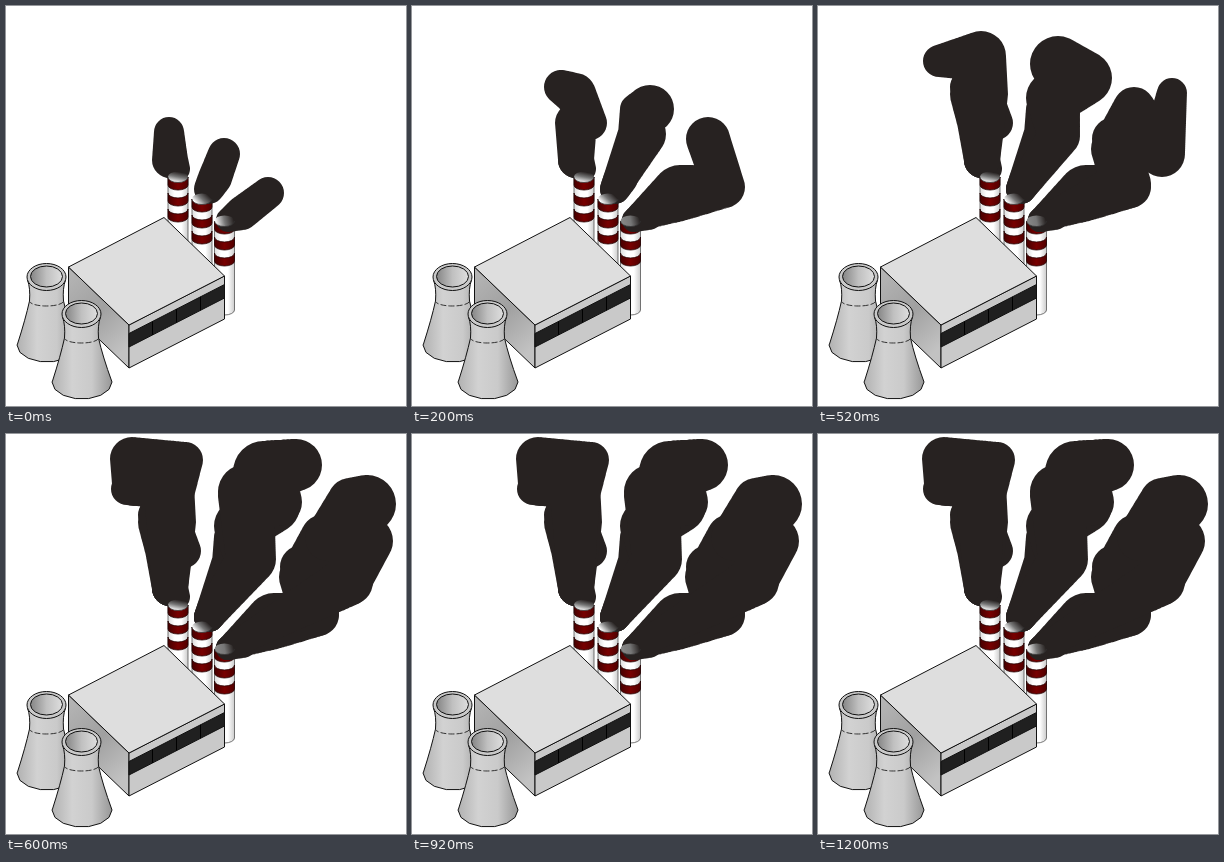
Recreate the animation shown at these times as an HTML page with a canvas. Size 400 by 400 pixels, loop 1400 ms.

```html
<!DOCTYPE html>
<html lang="en">
<head>
<meta charset="utf-8">
<title>Factory smoke</title>
<style>
html, body { margin: 0; height: 100%; overflow: hidden; background: #fff; }
canvas { display: block; width: 100vw; height: 100vh; }
</style>
</head>
<body>
<canvas id="stage" width="400" height="400"></canvas>
<script>
const ctx = document.getElementById('stage').getContext('2d');
const STEP = 200, LOOP = 1400, SMOKE = '#272221', INK = '#111';

// Puffs are x, y, radius. Each step adds a chain of puffs that tapers to the foot.
const left = {
  foot: [164, 154, 18],
  steps: [
    [[172, 163, 12], [164, 154, 18], [163, 126, 15]],
    [[149, 81, 17], [163, 88, 21], [178, 117, 17], [164, 117, 21]],
    [[121, 55, 16], [163, 50, 25], [161, 88, 29], [163, 115, 24]],
    [[128, 50, 22], [126, 25, 22], [179, 26, 18], [163, 60, 25]]
  ]
};
const middle = {
  foot: [203, 183, 15],
  steps: [
    [[218, 148, 16], [209, 172, 17]],
    [[238, 103, 24], [223, 103, 15], [230, 128, 24]],
    [[240, 58, 28], [267, 72, 27], [235, 92, 27], [241, 130, 21]],
    [[290, 31, 26], [258, 38, 31], [272, 68, 24], [240, 62, 28], [245, 125, 25]]
  ]
};
const right = {
  foot: [222, 214, 12],
  steps: [
    [[262, 187, 16], [236, 207, 17]],
    [[296, 133, 22], [312, 181, 21], [268, 187, 28]],
    [[354, 87, 15], [344, 148, 23], [316, 102, 21], [297, 143, 24], [308, 178, 25]],
    [[361, 70, 29], [344, 66, 22], [322, 104, 23], [362, 107, 25], [340, 148, 25]]
  ]
};

function shade(x0, y0, x1, y1, ...colors) {
  const g = ctx.createLinearGradient(x0, y0, x1, y1);
  colors.forEach((c, i) => g.addColorStop(i / (colors.length - 1), c));
  return g;
}

function paint(fill, line = INK, width = 1) {
  ctx.fillStyle = fill;
  ctx.fill();
  if (!line) return;
  ctx.strokeStyle = line;
  ctx.lineWidth = width;
  ctx.stroke();
}

function poly(fill, ...points) {
  ctx.beginPath();
  for (const p of points) ctx.lineTo(...p);
  ctx.closePath();
  paint(fill);
}

function oval(x, y, rx, ry, fill, line) {
  ctx.beginPath();
  ctx.ellipse(x, y, rx, ry, 0, 0, 7);
  paint(fill, line);
}

// Sweeps a circle of changing size along the chain
function cloud(chain) {
  ctx.beginPath();
  for (let i = 1; i < chain.length; i++) {
    for (let t = 0; t <= 1; t += 1 / 32) {
      const [x, y, r] = chain[i].map((v, k) => chain[i - 1][k] * (1 - t) + v * t);
      ctx.moveTo(x + r, y);
      ctx.arc(x, y, r, 0, 7);
    }
  }
  paint(SMOKE, null);
}

// Slice of a cylinder with curved top and bottom
function slice(x, top, bottom, fill, line) {
  ctx.beginPath();
  ctx.ellipse(x, top, 10, 5, 0, Math.PI, 0, true);
  ctx.ellipse(x, bottom, 10, 5, 0, 0, Math.PI);
  ctx.closePath();
  paint(fill, line, .8);
}

function stack(x, y) {
  const across = (...colors) => shade(x - 10, 0, x + 10, 0, ...colors);
  slice(x, y, y + 89, across('#ddd', '#fff', '#fff', '#ccc'), '#555');
  for (let i = 0; i < 3; i++) {
    const top = y + 16 * i;
    slice(x, top, top + 8, across('#450000', '#780000', '#500000'), '#200');
  }
}

function mouth(x, y, dx, dy, light) {
  oval(x, y, 10, 5.5, shade(x + dx, y + dy, x - dx, y - dy, SMOKE, '#777', light), null);
  ctx.beginPath();
  ctx.ellipse(x, y, 10, 5.5, 0, 0, Math.PI);
  ctx.strokeStyle = '#333';
  ctx.lineWidth = .7;
  ctx.stroke();
}

function building() {
  const west = [62.5, 261], north = [158, 211.5], east = [218.5, 270], south = [123, 319];
  const down = ([x, y], h) => [x, y + h];
  poly(shade(62, 270, 123, 340, '#b4b4b4', '#a0a0a0', '#c2c2c2'), west, south, down(south, 43), down(west, 43));
  poly('#c9c9c9', south, east, down(east, 43), down(south, 43));
  poly('#dedede', west, north, east, south);
  poly('#202020', down(south, 8.5), down(east, 8.5), down(east, 22), down(south, 22));
  ctx.strokeStyle = '#000';
  ctx.beginPath();
  for (let x = 146.5; x < 200; x += 24) {
    const y = 327.5 - (x - 123) * .513;
    ctx.moveTo(x, y);
    ctx.lineTo(x, y + 13.5);
  }
  ctx.stroke();
}

function tower(x, y) {
  ctx.save();
  ctx.translate(x, y);
  ctx.beginPath();
  ctx.moveTo(-19, 3);
  ctx.quadraticCurveTo(-16, 11, -17, 24);
  ctx.quadraticCurveTo(-21, 42, -29, 67);
  for (let i = 0; i <= 7; i++) {
    const a = Math.PI * (1 - i / 7);
    ctx.lineTo(.5 + 30 * Math.cos(a), 68 + 17 * Math.sin(a));
  }
  ctx.quadraticCurveTo(21, 42, 17, 24);
  ctx.quadraticCurveTo(16, 11, 19, 3);
  ctx.closePath();
  paint(shade(-29, 0, 30, 0, '#b2b2b2', '#d2d2d2', '#cacaca', '#989898'));
  oval(0, 0, 19.5, 13.5, '#c9c9c9');
  oval(0, -.5, 16, 10.5, shade(-16, 0, 16, 0, '#858585', '#c0c0c0', '#dedede'));
  ctx.beginPath();
  ctx.ellipse(0, 24, 17, 5, 0, .1, Math.PI - .1);
  ctx.setLineDash([6, 2]);
  ctx.strokeStyle = '#333';
  ctx.stroke();
  ctx.restore();
}

function draw(now) {
  const step = Math.floor(now % LOOP / STEP);
  ctx.fillStyle = '#fff';
  ctx.fillRect(0, 0, 400, 400);
  stack(172, 171);
  stack(196, 193);
  stack(218.5, 215);
  building();
  tower(40.5, 271);
  tower(75.5, 308);
  for (const { foot, steps } of [left, middle, right])
    for (const chain of steps.slice(0, step + 1)) cloud([...chain, foot]);
  mouth(172, 171, 1, -5, '#eee');
  mouth(196, 193, 5, -5, '#fff');
  mouth(218.5, 215, 9, -2, step % 6 ? '#888' : '#fff');
  requestAnimationFrame(draw);
}
requestAnimationFrame(draw);
</script>
</body>
</html>
```
